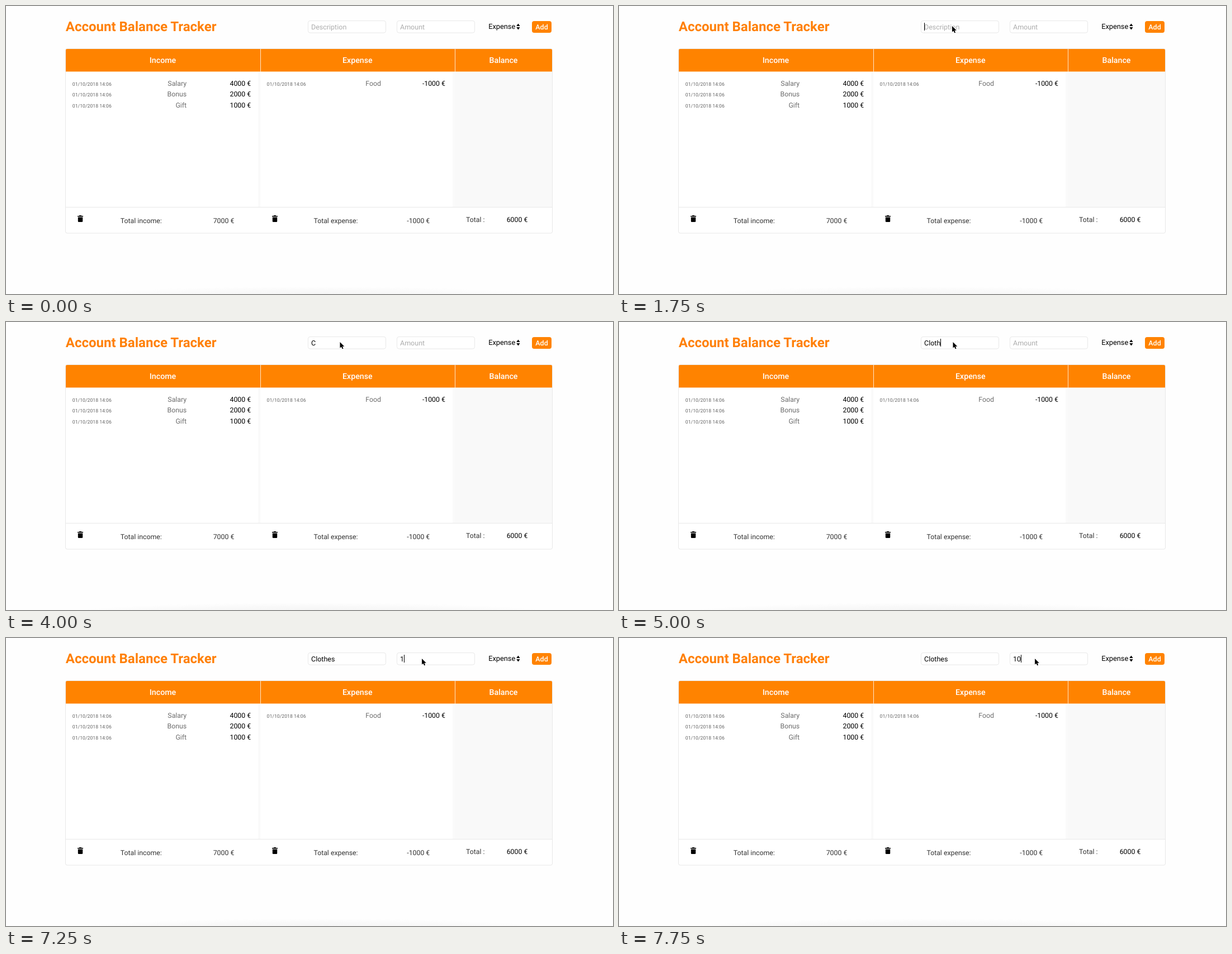
An HTML page for the animation above (8 s loop, 1086x516 px).

```html
<!DOCTYPE html>
<html lang="en">
<head>
<meta charset="utf-8">
<title>Account Balance Tracker</title>
<style>
  html, body { margin: 0; width: 100%; height: 100%; overflow: hidden; background: #fefefe; }
  svg { display: block; width: 1086px; height: 516px; }
  text { font: 12.3px Roboto, sans-serif; fill: #000; text-rendering: geometricPrecision; white-space: pre; }
  .title { font-size: 24px; font-weight: 700; fill: #ff8008; }
  .head { font-size: 14.2px; font-weight: 500; fill: #fff; text-anchor: middle; }
  .date { font-size: 8.7px; fill: #666; }
  .label { fill: #6c6c6c; text-anchor: end; }
  .num { text-anchor: end; }
  .sum { fill: #333; }
  .field { font-size: 12.5px; }
  .hint { fill: #adadad; }
  .box { fill: #fff; stroke: #e8e8e8; }
  .orange { fill: #ff8300; }
  .line { stroke: #e9e9e9; }
</style>
</head>
<body>
<svg viewBox="0 0 1086 516">
  <defs>
    <radialGradient id="shade" gradientUnits="userSpaceOnUse" cx="0" cy="0" r="1"
      gradientTransform="translate(546 519) scale(425 16)">
      <stop offset="0" stop-color="#f5f5f5"/>
      <stop offset=".6" stop-color="#f9f9f9"/>
      <stop offset="1" stop-color="#fefefe"/>
    </radialGradient>
    <g id="bin">
      <path d="M0 1.2h2.6l.8-.9h3.2l.8.9H10v1.5H0zM.8 3.6h8.4V11a1.3 1.3 0 0 1-1.3 1.3H2.1A1.3 1.3 0 0 1 .8 11z"/>
    </g>
  </defs>

  <rect y="502" width="1086" height="14" fill="url(#shade)"/>
  <text class="title" x="106.8" y="45.4">Account Balance Tracker</text>

  <rect class="box" x="540.5" y="26.5" width="139" height="21.5" rx="3.5"/>
  <rect class="box" x="699.5" y="26.5" width="139" height="21.5" rx="3.5"/>
  <text id="desc" class="field" x="546" y="42"></text>
  <text id="amount" class="field" x="705" y="42"></text>
  <rect id="caret" y="30" width="1" height="14"/>

  <text class="field" x="863.2" y="41.4" style="font-size:12.8px">Expense</text>
  <path d="M913.2 36l3.2-4.6 3.2 4.6zM913.2 38h6.4l-3.2 4.6z"/>
  <rect class="orange" x="941" y="27" width="35" height="21" rx="4"/>
  <text class="field" x="958.5" y="42" style="fill:#fff;font-weight:500;text-anchor:middle">Add</text>

  <rect class="box" x="106.5" y="76.5" width="871" height="330.5" rx="3"/>
  <rect x="451" y="118" width="4" height="242" fill="#fafafa"/>
  <rect x="799" y="118" width="4" height="242" fill="#fafafa"/>
  <rect x="803" y="118" width="174" height="242" fill="#f9f9f9"/>
  <path class="orange" d="M107 117.6V79q0-2 2-2h866q2 0 2 2v38.6z"/>
  <path d="M455.5 77v41M803.5 77v41" stroke="#ffe6cc"/>
  <path class="line" d="M107 360.5h870"/>
  <text class="head" x="280.5" y="102">Income</text>
  <text class="head" x="628.8" y="102">Expense</text>
  <text class="head" x="890" y="102">Balance</text>

  <g id="rows"></g>

  <use href="#bin" x="128" y="374.8"/>
  <text class="sum" x="204.8" y="388.9">Total income:</text>
  <text class="sum num" x="408.3" y="388.9">7000 €</text>
  <use href="#bin" x="476" y="374.8"/>
  <text class="sum" x="550.4" y="388.9">Total expense:</text>
  <text class="sum num" x="758.3" y="388.9">-1000 €</text>
  <text class="sum" x="823" y="387.4">Total :</text>
  <text class="num" x="933.3" y="387.4">6000 €</text>

  <path id="pointer" d="M0 0v10.6l2.5-2.2 1.7 3.9 1.9-.9-1.7-3.7h3.4z"
    stroke="#fff" stroke-width="1.2" paint-order="stroke"/>
</svg>
<script>
  const $ = id => document.getElementById(id);
  const desc = $("desc"), amount = $("amount"), caret = $("caret"), pointer = $("pointer");
  const LOOP = 8000;

  const row = (left, i, label, value) => {
    const y = 142.6 + i * 19.7;
    return `<text class="date" x="${left + 12}" y="${y}">01/10/2018 14:06</text>` +
      `<text class="label" x="${left + 216.3}" y="${y}">${label}</text>` +
      `<text class="num" x="${left + 331.3}" y="${y}">${value} €</text>`;
  };
  $("rows").innerHTML = row(106.8, 0, "Salary", 4000) + row(106.8, 1, "Bonus", 2000) +
    row(106.8, 2, "Gift", 1000) + row(454.6, 0, "Food", -1000);

  // Each track holds [start, value...] entries; values jump at their start time.
  const path = [[500, 609, 59], [750, 602, 46], [1000, 595, 34], [1250, 595, 36], [1500, 599, 43],
    [1750, 596, 36], [2250, 597.5, 36], [5750, 690, 1], [6000, 745, 24], [6250, 745, 36], [6500, 744, 37]];
  const descText = [[0, ""], [2750, "V"], [3250, ""], [3500, "C"], [4250, "Cl"], [4500, "Clo"],
    [4750, "Clot"], [5000, "Cloth"], [5250, "Clothe"], [5500, "Clothes"]];
  const amountText = [[0, ""], [7250, "1"], [7750, "10"]];
  const focus = [[0, null], [1750, desc], [2250, null], [2750, desc], [4000, null], [4250, desc],
    [5750, null], [6500, amount], [7000, null], [7250, amount]];

  const at = (track, t) => track.findLast(k => k[0] <= t);

  function fill(el, value, hint) {
    el.textContent = value || hint;
    el.classList.toggle("hint", !value);
    el.dataset.value = value;
  }

  function draw(t) {
    fill(desc, at(descText, t)[1], "Description");
    fill(amount, at(amountText, t)[1], "Amount");

    const el = at(focus, t)[1];
    caret.style.display = el ? "" : "none";
    if (el) {
      const width = el.dataset.value ? el.getComputedTextLength() : 0;
      caret.setAttribute("x", Math.round(+el.getAttribute("x") + width));
    }

    const p = at(path, t);
    pointer.style.display = p ? "" : "none";
    if (p) pointer.setAttribute("transform", `translate(${p[1]} ${p[2]})`);
  }

  const start = performance.now();
  function tick() {
    draw((performance.now() - start) % LOOP);
    requestAnimationFrame(tick);
  }
  tick();
</script>
</body>
</html>
```
